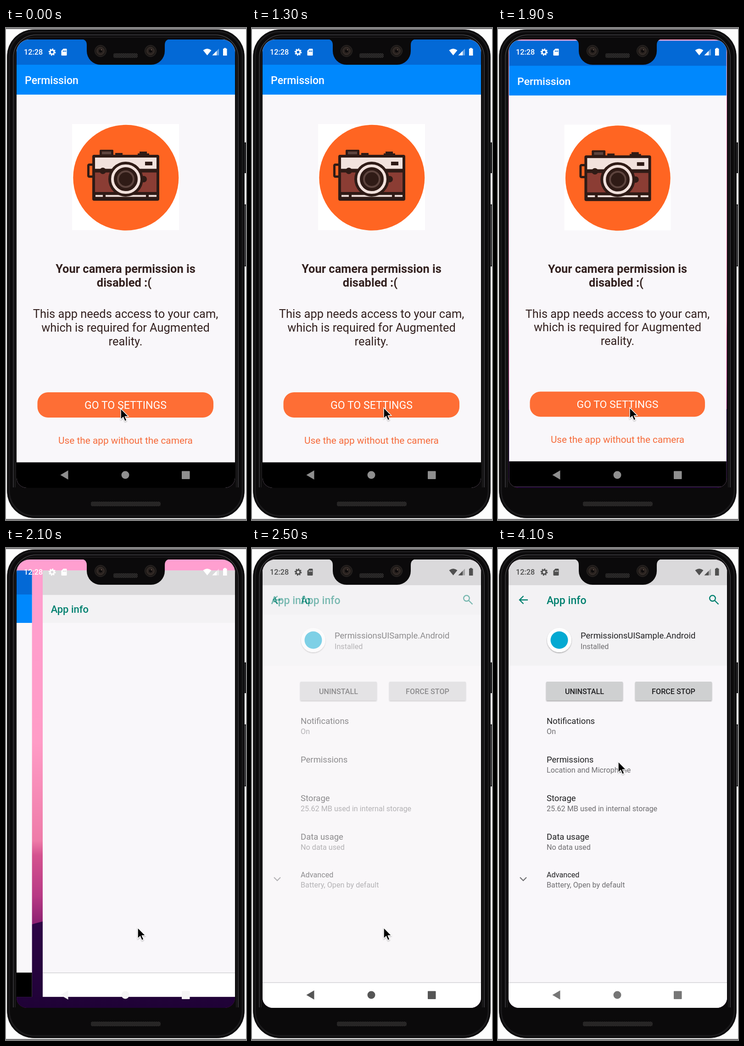
These frames come from a looping animation (523 by 1071 pixels, 4200 ms). An HTML page:

```html
<!DOCTYPE html>
<html lang="en">
<head>
<meta charset="utf-8">
<title>Camera permission</title>
<style>
  html, body { margin: 0; width: 100%; height: 100%; overflow: hidden; background: #fdfdfd; }
  svg { display: block; width: 100%; height: 100%; }
  text { font-family: Roboto, sans-serif; font-size: 18.5px; fill: #202022; }
  .bar { font-size: 23.1px; font-weight: 500; }
  .teal { fill: #00806f; }
  .small { font-size: 16.2px; }
  .sub { font-size: 16.2px; fill: #6f6e71; }
  .medium { font-size: 16.2px; font-weight: 500; }
  .big { font-size: 25.45px; fill: #33211f; }
  .mid { text-anchor: middle; }
</style>
</head>
<body>
<svg viewBox="0 0 523 1071">
  <defs>
    <clipPath id="screen">
      <path d="M23 53A28 28 0 0 1 51 25H471A28 28 0 0 1 499 53V979A22 22 0 0 1 477 1001H45A22 22 0 0 1 23 979Z"/>
    </clipPath>
    <linearGradient id="sky" gradientUnits="userSpaceOnUse" x1="0" y1="25" x2="0" y2="820">
      <stop offset="0" stop-color="#ff9fd0"/>
      <stop offset=".5" stop-color="#ff9cc6"/>
      <stop offset=".77" stop-color="#ee7ba8"/>
      <stop offset=".81" stop-color="#d4528f"/>
      <stop offset=".92" stop-color="#b83a85"/>
      <stop offset="1" stop-color="#8a2070"/>
    </linearGradient>
    <linearGradient id="night" x2="0" y2="1">
      <stop stop-color="#300648"/><stop offset="1" stop-color="#1f0236"/>
    </linearGradient>
    <pattern id="mesh" width="4" height="4" patternUnits="userSpaceOnUse">
      <rect width="4" height="4" fill="#1b1a1a"/>
      <path d="M0 0L4 4M4 0L0 4" stroke="#393737" stroke-width=".8"/>
    </pattern>
    <filter id="shadow" x="-50%" y="-50%" width="200%" height="200%">
      <feDropShadow dx="0" dy="1.5" stdDeviation="1.2" flood-opacity=".35"/>
    </filter>
  </defs>

  <!-- phone body -->
  <path d="M0 1H523M0 1070H523" stroke="#6c6b6d" stroke-width="2.5"/>
  <rect x="517" y="249" width="8" height="67" fill="#202022"/>
  <rect x="517" y="384" width="8" height="135" fill="#202022"/>
  <path d="M521 386V517" stroke="#77777a"/>
  <rect x="2.500" y="3.500" width="517" height="1063" rx="58" fill="#0b0a0b" stroke="#1d1c1e"/>
  <g fill="none">
    <rect x="7" y="8" width="508" height="1054" rx="54" stroke="#1b1a1c" stroke-width="3"/>
    <path d="M16 1000V64A49 49 0 0 1 65 15H457A49 49 0 0 1 506 64V1000" stroke="#434245" stroke-width="1.500"/>
    <path d="M20 1000V62A42 42 0 0 1 62 20H460A42 42 0 0 1 502 62V1000" stroke="#242325" stroke-width="1.500"/>
  </g>
  <rect x="185" y="1031" width="152" height="10" rx="4" fill="url(#mesh)"/>

  <g clip-path="url(#screen)">
    <rect x="22" y="24" width="478" height="978" fill="url(#sky)"/>
    <path d="M22 832Q50 820 80 813Q260 765 500 830V1002H22Z" fill="url(#night)"/>

    <g id="permission">
      <rect x="23" y="25" width="476" height="976" fill="#f9f7fa"/>
      <rect x="23" y="25" width="476" height="56" fill="#0369d6"/>
      <rect x="23" y="80" width="476" height="65" fill="#0088fd"/>
      <rect x="23" y="945.500" width="476" height="55.500"/>
      <text class="bar" x="41" y="122" style="fill:#fff">Permission</text>

      <rect x="144" y="209" width="233" height="231" fill="#fff"/>
      <circle cx="261.300" cy="325.800" r="115" fill="#ff6522"/>
      <g fill="#2f1b16">
        <rect x="179.500" y="297.500" width="16" height="26" rx="2" fill="none" stroke="#2f1b16" stroke-width="5"/>
        <rect x="204" y="265" width="30" height="14" rx="2"/>
        <rect x="209" y="269" width="20" height="6" fill="#5d443e"/>
        <path d="M238 272h16v6h-16zM291 269h16v4h5v6h-25v-6h4z"/>
        <rect x="188" y="276" width="146" height="100" rx="4"/>
        <rect x="194" y="282" width="134" height="24.500" fill="#f2e2dd"/>
        <rect x="194" y="314.500" width="134" height="42.500" fill="#8b3d34"/>
        <path d="M195 363.500h16v4h-16zM217 363.500h88v4h-88zM311 363.500h17v4h-17z" fill="#f2e2dd"/>
        <rect x="303" y="291" width="16" height="8"/>
        <circle cx="211" cy="311" r="7"/>
        <circle cx="300" cy="329" r="7"/>
        <circle cx="261" cy="329" r="38"/>
        <circle cx="261" cy="329" r="29" fill="none" stroke="#f1e1dc" stroke-width="6"/>
        <circle cx="261" cy="329" r="17" fill="none" stroke="#5d443e" stroke-width="4"/>
      </g>

      <text class="big mid" x="260.500" y="533" font-weight="700">Your camera permission is</text>
      <text class="big mid" x="257.500" y="563" font-weight="700">disabled :(</text>
      <text class="big mid" x="260.500" y="631.400">This app needs access to your cam,</text>
      <text class="big mid" x="260.500" y="661.200">which is required for Augmented</text>
      <text class="big mid" x="260.500" y="691">reality.</text>
      <rect x="68.500" y="793" width="383.500" height="55" rx="23" fill="#fe6e35"/>
      <text class="mid" x="260.500" y="829" style="font-size:23.1px;fill:#fff">GO TO SETTINGS</text>
      <text class="mid" x="260.500" y="905" style="font-size:20.8px;fill:#f66b3b">Use the app without the camera</text>
    </g>

    <g id="appInfo">
      <rect x="23" y="25" width="476" height="976" fill="#f9f7fa"/>
      <rect x="23" y="80" width="476" height="176" fill="#f3f2f4"/>
      <g fill="none" stroke="#00806f" stroke-width="2.4">
        <path d="M65 113H48M55.500 104.500L47 113L55.500 121.500"/>
        <circle cx="467.500" cy="109.500" r="6.300"/>
        <path d="M472 114L480.500 122.500"/>
      </g>
      <text class="bar teal" x="106" y="122">App info</text>
      <circle cx="133.500" cy="200.500" r="26.500" fill="#fff" filter="url(#shadow)"/>
      <circle cx="133.500" cy="200.500" r="19" fill="#03a9d2"/>
      <text x="180" y="197">PermissionsUISample.Android</text>
      <text class="sub" x="180" y="220">Installed</text>
      <g fill="#cfd0d1" filter="url(#shadow)">
        <rect x="105" y="291" width="167" height="41" rx="2"/>
        <rect x="299" y="291" width="167" height="41" rx="2"/>
      </g>
      <text class="medium mid" x="188.500" y="318">UNINSTALL</text>
      <text class="medium mid" x="382.500" y="318">FORCE STOP</text>
      <text x="106" y="382.500">Notifications</text>
      <text class="sub" x="106" y="405">On</text>
      <text x="106" y="466.500">Permissions</text>
      <text class="sub" x="106" y="489" id="granted">Location and Microphone</text>
      <text x="106" y="550.500">Storage</text>
      <text class="sub" x="106" y="573">25.62 MB used in internal storage</text>
      <text x="106" y="634.500">Data usage</text>
      <text class="sub" x="106" y="657">No data used</text>
      <path d="M48 717L55 724L62 717" fill="none" stroke="#6f6e71" stroke-width="2.200"/>
      <text class="small" x="106" y="717">Advanced</text>
      <text class="sub" x="106" y="739">Battery, Open by default</text>
      <g id="startup">
        <rect x="23" y="80" width="476" height="866" fill="#f9f7fa"/>
        <rect x="23" y="80" width="476" height="65" fill="#f3f2f4"/>
        <text class="bar teal" x="41.600" y="122">App info</text>
      </g>
      <rect x="23" y="25" width="476" height="56" fill="#dad9db"/>
      <rect x="23" y="945" width="476" height="56" fill="#fff"/>
      <path d="M23 946H499" stroke="#d2d1d4" stroke-width="1.500"/>
    </g>

    <g id="status" fill="currentColor">
      <text class="medium" x="39" y="58" style="fill:currentColor">12:28</text>
      <g fill="none" stroke="currentColor">
        <circle cx="100.500" cy="52.500" r="4.500" stroke-width="3.200"/>
        <circle cx="100.500" cy="52.500" r="6.700" stroke-width="2.400" pathLength="16" stroke-dasharray="1"/>
      </g>
      <path fill-rule="evenodd" d="M125 45H131Q132.500 45 132.500 46.500V58.500Q132.500 60 131 60H122Q120.500 60 120.500 58.500V49.500ZM124 49v3h1.500v-3zM126.700 49v3h1.500v-3zM129.400 49v3h1.500v-3z"/>
      <path d="M429.500 48.500Q438.500 41.500 447.500 48.500L438.500 59.500Z"/>
      <path d="M464 45V59.500H449.500Z" opacity=".4"/>
      <path d="M459 50V59.500H449.500Z"/>
      <path d="M475 45V43.500H479.500V45H481.500V60H473V45Z"/>
    </g>
    <g id="nav" fill="currentColor">
      <path d="M118.500 973L135.500 963V983Z"/>
      <circle cx="260" cy="973" r="8.500"/>
      <rect x="383" y="964.500" width="17.500" height="17.500" rx="1"/>
    </g>
  </g>

  <!-- notch -->
  <path d="M164 24Q176 25 176 37V50A30 30 0 0 0 206 80H316A30 30 0 0 0 346 50V37Q346 25 358 24Z" fill="#0b0a0b"/>
  <rect x="234" y="55" width="53" height="10" rx="4" fill="url(#mesh)"/>
  <g id="lenses"></g>

  <path id="cursor" d="M0 0V25.500L5.700 20.200L9.800 29.500L14 27.700L10.100 18.600L18 18.300Z" stroke="#fff" stroke-width="1.500" filter="url(#shadow)"/>
</svg>
<script>
const LOOP = 4200, STEP = 100, WIDTH = 476, CENTER_X = 261, CENTER_Y = 512.5;
const $ = id => document.getElementById(id);

$('lenses').innerHTML = [206, 315].map(x => `
  <circle cx="${x}" cy="50" r="12.500" fill="#1d1917" stroke="#302c2a"/>
  <circle cx="${x}" cy="50" r="8" fill="#2a2320" stroke="#453a35"/>
  <circle cx="${x}" cy="50" r="3.500" fill="#0e0b0b"/>
  <circle cx="${x + 2}" cy="47.500" r="1.300" fill="#66554c"/>`).join('');

const lerp = (a, b, k) => a + (b - a) * k;
const ramp = (t, from, to) => Math.min(1, Math.max(0, (t - from) / (to - from)));
const smooth = k => k * k * (3 - 2 * k);
const easeOut = k => 1 - (1 - k) ** 3;
const gray = v => `rgb(${v},${v},${v})`;

function placeWindow(id, offset, scale) {
  $(id).setAttribute('transform',
    `translate(${CENTER_X + offset} ${CENTER_Y}) scale(${scale}) translate(${-CENTER_X} ${-CENTER_Y})`);
}

function draw(t) {
  // windows shrink, slide one screen to the left, then grow back
  const shrink = smooth(ramp(t, 1875, 2000)) - smooth(ramp(t, 2180, 2450));
  const scale = 1 - 0.049 * shrink;
  const slide = easeOut(ramp(t, 1981, 2200));
  placeWindow('permission', -WIDTH * slide, scale);
  placeWindow('appInfo', WIDTH * (1 - slide), scale);

  $('startup').setAttribute('opacity', 1 - ramp(t, 2400, 2600));
  $('granted').setAttribute('opacity', ramp(t, 2600, 2800));

  $('status').style.color = gray(lerp(255, 80, ramp(t, 2150, 2400)));
  const navShade = t < 2000 ? 143
    : lerp(lerp(245, 85, ramp(t, 2150, 2450)), 118, ramp(t, 2500, 3000));
  $('nav').style.color = gray(navShade);

  const aim = smooth(ramp(t, 0, 1250)), rise = smooth(ramp(t, 3600, 4100));
  const x = lerp(lerp(250, 287, aim), 262, rise);
  const y = lerp(lerp(828.5, 826.5, aim), 465, rise);
  $('cursor').setAttribute('transform', `translate(${x} ${y}) scale(.93)`);
}

const start = performance.now();
function tick() {
  const t = (performance.now() - start) % LOOP;
  draw(Math.floor(t / STEP) * STEP);
  requestAnimationFrame(tick);
}
tick();
</script>
</body>
</html>
```
